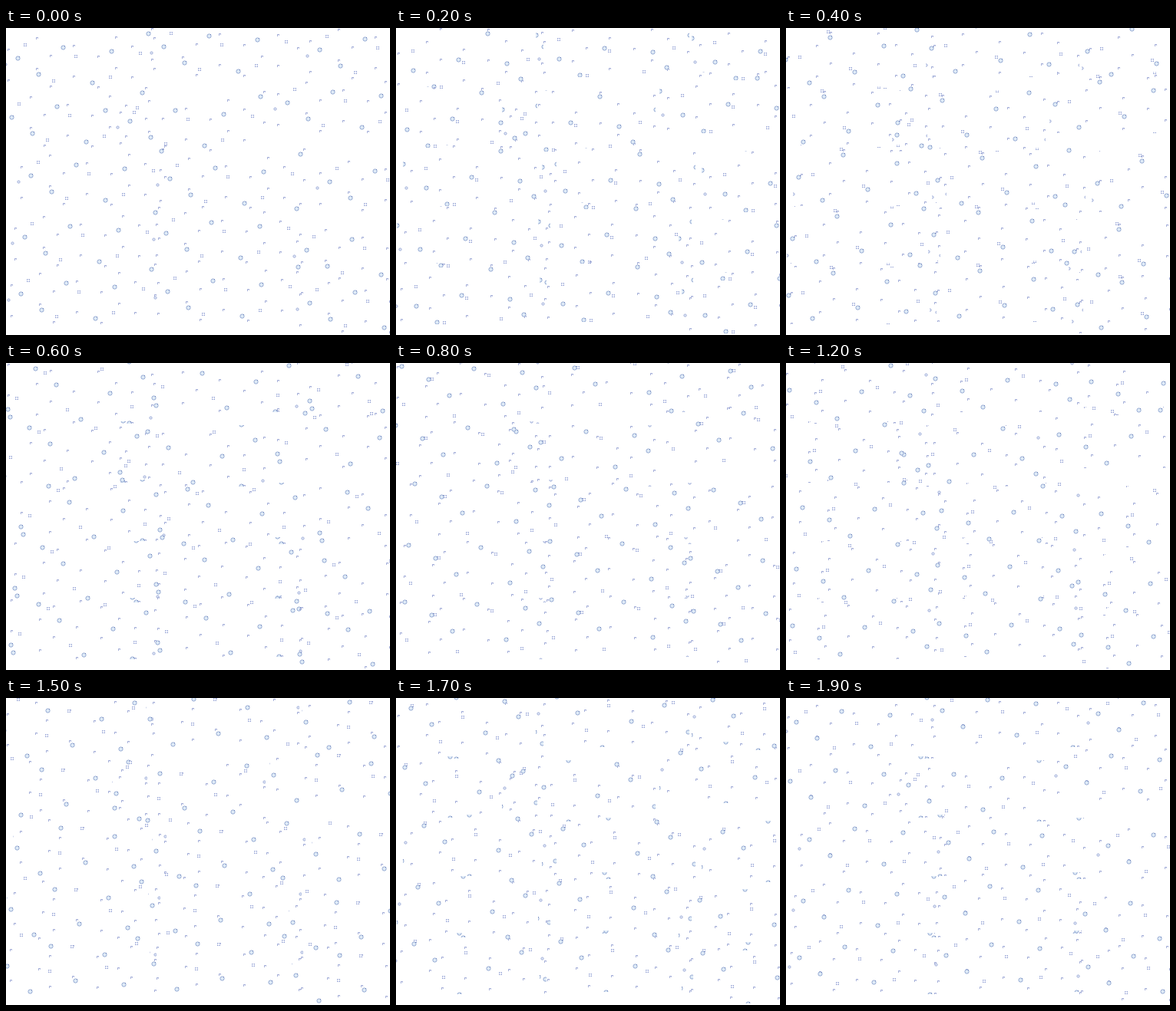
Animation of 500 by 400 pixels, one loop 2 s. Source, as an HTML page with a canvas:

```html
<!DOCTYPE html>
<html>
<head>
<meta charset="utf-8">
<title>Snowfall</title>
<style>
html, body { margin: 0; width: 100%; height: 100%; overflow: hidden; background: #fff; }
canvas { display: block; }
</style>
</head>
<body>
<canvas id="stage" width="500" height="400"></canvas>
<script>
const ctx = document.getElementById('stage').getContext('2d');
const STEPS = 20, STEP_MS = 100;
const TILE_W = 200, TILE_H = 80, LEFT = -23, TOP = -40;

// The same snow tile is laid out fifteen times.
const tiles = [
  [15, 39], [205, 24], [408, 28],
  [7, 116], [161, 121], [366, 97],
  [32, 192], [213, 196], [421, 200],
  [24, 272], [208, 267], [391, 289],
  [19, 346], [210, 343], [395, 358]
];

const bigFlakes = [[0, 0], [27, 21], [59, -14], [97, 32], [122, -9]];
const boxes = [[10, -17], [76, -2], [47, 30], [121, 25], [160, -6]];
const ring = [184, 8];
// x, y, amount of sway; each speck repeats 40px lower
const specks = [
  [-12, -11, .2], [25, -26, .2], [43, -3, 1], [73, -16, 1],
  [105, -2, 1], [128, -27, .2], [149, -15, 1], [175, 2, 0]
];

// Steps at which the paths have control points; the last closes the loop.
const keys = [0, 4, 6, 10, 12, 15, 19, 20];
const bigX = [0, 15, 23, 29, 24, 12, -2, 0];
const bigY = [0, 32, 48, 76, 92, 116, 152, 160];
const boxX = [0, -7, -11, -18, -17, -9, 1, 0];
const speckX = [0, 0, 0, -9, -11, -5, 0, 0];
const speckY = [0, 10, 14, 20, 26, 33, 37, 40];
const driftX = [170, 184, 187, 196, 189, 182, 168, 170];
const driftY = [-32, 2, 21, 67, 76, 83, 120, 128];

// Smooth cyclic curve through the control points
function along(values, t) {
  const n = keys.length - 1, gain = values[n] - values[0];
  const at = i => {
    const lap = Math.floor(i / n), k = i - lap * n;
    return [keys[k] + lap * STEPS, values[k] + lap * gain];
  };
  const slope = i => {
    const a = at(i - 1), b = at(i + 1);
    return (b[1] - a[1]) / (b[0] - a[0]);
  };
  let i = 0;
  while (i < n - 1 && t >= keys[i + 1]) i++;
  const [t0, v0] = at(i), [t1, v1] = at(i + 1);
  const h = t1 - t0, u = (t - t0) / h, w = 1 - u;
  return v0 * (1 + 2 * u) * w * w + slope(i) * h * u * w * w +
         v1 * u * u * (3 - 2 * u) - slope(i + 1) * h * u * u * w;
}

const wrap = (v, low, size) => low + (((v - low) % size) + size) % size;

// Draws a part inside the tile and again where it crosses an edge.
function place(draw, x, y) {
  x = Math.round(wrap(x, LEFT, TILE_W));
  y = Math.round(wrap(y, TOP, TILE_H));
  const xs = [x], ys = [y], m = 4;
  if (x < LEFT + m) xs.push(x + TILE_W);
  if (x > LEFT + TILE_W - m) xs.push(x - TILE_W);
  if (y < TOP + m) ys.push(y + TILE_H);
  if (y > TOP + TILE_H - m) ys.push(y - TILE_H);
  for (const px of xs) for (const py of ys) draw(px, py);
}

function disc(x, y, r, fill, line) {
  ctx.beginPath();
  ctx.arc(x + .5, y + .5, r, 0, Math.PI * 2);
  ctx.fillStyle = fill;
  ctx.fill();
  ctx.strokeStyle = line;
  ctx.lineWidth = 1;
  ctx.stroke();
}

function dot(x, y, w, h, color) {
  ctx.fillStyle = color;
  ctx.fillRect(x, y, w, h);
}

function bigFlake(x, y) {
  disc(x, y, 2.6, '#dfebf7', '#94a9d3');
  dot(x + 2, y - 2, 1, 1, '#7187bd');
}

function smallRing(x, y) {
  disc(x, y, 1.6, '#e8effa', '#98a7d5');
}

function box(x, y) {
  dot(x - 2, y - 2, 4, 4, '#cbd2ec');
  dot(x - 1, y - 1, 2, 2, '#f7f9ff');
  for (const dx of [-2, 1]) {
    for (const dy of [-2, 1]) dot(x + dx, y + dy, 1, 1, '#96a3d2');
  }
}

function speck(x, y) {
  dot(x - 1, y - 1, 3, 1, '#a5afd9');
  dot(x - 1, y, 1, 2, '#a5afd9');
  dot(x + 1, y, 1, 1, '#c3cae7');
}

function drawTile(t) {
  const bx = along(bigX, t), by = along(bigY, t);
  const sx = along(boxX, t), sy = t * 4;
  const px = along(speckX, t), py = along(speckY, t);
  for (const [x, y, sway] of specks) {
    place(speck, x + px * sway, y + py);
    place(speck, x + px * sway, y + py + 40);
  }
  for (const [x, y] of boxes) place(box, x + sx, y + sy);
  place(smallRing, ring[0] + sx, ring[1] + sy);
  for (const [x, y] of bigFlakes) place(bigFlake, x + bx, y + by);
  if (t > 0 && t < 18) place(bigFlake, 140 + bx, 11 + by);
  const dx = along(driftX, t), dy = along(driftY, t);
  place(bigFlake, dx, dy);
  if (t > 4 && t < 8) place(bigFlake, dx + 3, dy + 10);
}

function frame(now) {
  const t = Math.floor(now / STEP_MS) % STEPS;
  ctx.fillStyle = '#fff';
  ctx.fillRect(0, 0, 500, 400);
  for (const [x, y] of tiles) {
    ctx.save();
    ctx.translate(x, y);
    ctx.beginPath();
    ctx.rect(LEFT, TOP, TILE_W, TILE_H);
    ctx.clip();
    drawTile(t);
    ctx.restore();
  }
}

const start = performance.now();
function tick() {
  frame(performance.now() - start);
  requestAnimationFrame(tick);
}
tick();
</script>
</body>
</html>
```
